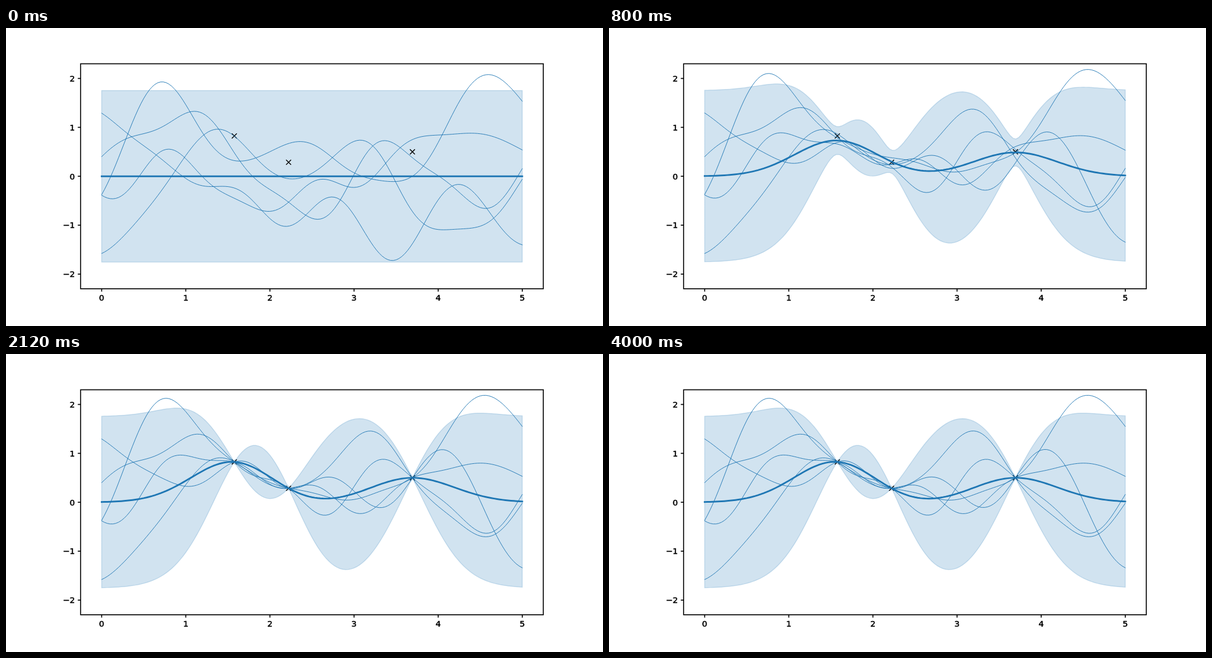
An HTML page with a canvas that plays this animation: 1058x529 px, repeating every 4.04 s.

```html
<!DOCTYPE html>
<html lang="en">
<head>
<meta charset="utf-8">
<title>Gaussian process regression</title>
<style>
  html, body { margin: 0; width: 100%; height: 100%; overflow: hidden; background: #fff; }
  canvas { display: block; }
</style>
</head>
<body>
<canvas id="stage" width="1058" height="529"></canvas>
<script>
const ctx = document.getElementById('stage').getContext('2d');
const BLUE = '#1f77b4';
const FRAME_MS = 40, FRAMES = 101, VARIANCE = 0.8;
const BOX = { left: 132.25, right: 952.2, top: 63.5, bottom: 462.9 };
const px = x => BOX.left + (x + 0.25) / 5.5 * (BOX.right - BOX.left);
const py = y => BOX.top + (2.3 - y) / 4.6 * (BOX.bottom - BOX.top);

// noise scales each point's error variance; bias shifts its value while it is uncertain.
const observed = [
  { x: 1.577, y: 0.825, noise: 1.07, bias: -0.5 },
  { x: 2.222, y: 0.286, noise: 0.73, bias: 0.1 },
  { x: 3.694, y: 0.5, noise: 1, bias: 0 }
];
const obsX = observed.map(o => o.x);
const grid = Array.from({ length: 151 }, (_, i) => i / 30);

// Each sampled function: heights at the knots once the data is fitted,
// and its values at the observations before any fitting.
const knots = [0, 0.4, 0.8, 1.2, 2.6, 3, 3.35, 4.05, 4.5, 5];
const samples = [
  { fitted: [1.295, .79, .43, .4, .49, .23, -.1, 1.08, .03, -1.34], free: [-.24, -1.02, -1.38] },
  { fitted: [.4, .83, 1.1, 1.38, -.25, .32, .88, .04, -.61, .16], free: [.48, -.53, .38] },
  { fitted: [-.37, 1.29, 2.12, 1.42, .15, .055, .25, 1.25, 2.175, 1.55], free: [.32, .67, 0] },
  { fitted: [-.38, -.04, .9, .88, .3, -.21, .04, .65, .8, .53], free: [-.45, -.53, .75] },
  { fitted: [-1.58, -.97, -.12, .75, .56, 1.29, 1.33, -.15, -.69, -.02], free: [.82, -.05, -.72] }
];

const dot = (a, b) => a.reduce((sum, v, i) => sum + v * b[i], 0);
const kernel = (a, b) => VARIANCE * Math.exp(-2 * (a - b) ** 2);

// Lower triangular root of the covariance between the points xs.
function rootOf(covariance, xs, nugget = () => 0) {
  const L = [];
  xs.forEach((x, i) => {
    L.push(xs.map(() => 0));
    for (let j = 0; j <= i; j++) {
      const rest = covariance(x, xs[j]) + (i === j ? nugget(i) : 0) - dot(L[i], L[j]);
      L[i][j] = i === j ? Math.sqrt(Math.max(rest, 1e-9)) : rest / L[j][j];
    }
  });
  return L;
}

function solveLower(L, b) {
  const x = b.map(() => 0);
  for (let i = 0; i < b.length; i++) x[i] = (b[i] - dot(L[i], x)) / L[i][i];
  return x;
}

// Smooth curve through (xs, values) under a covariance.
function interpolator(covariance, xs, nugget) {
  const root = rootOf(covariance, xs, nugget);
  const basis = grid.map(x => solveLower(root, xs.map(k => covariance(x, k))));
  return values => {
    const whitened = solveLower(root, values);
    return basis.map(row => dot(row, whitened));
  };
}

function posterior(frame) {
  const precision = 0.41 * (Math.exp(0.24 * frame) - 1) + 1e-9;
  const noise = observed.map(o => o.noise / precision);
  const root = rootOf(kernel, obsX, i => noise[i]);
  const target = solveLower(root, observed.map((o, i) => o.y + o.bias * Math.sqrt(noise[i])));
  const project = x => solveLower(root, obsX.map(o => kernel(x, o)));
  return {
    mean: x => dot(project(x), target),
    covariance: (a, b) => kernel(a, b) - dot(project(a), project(b))
  };
}

const fitted = posterior(FRAMES - 1);
const throughKnots = interpolator(fitted.covariance, knots, () => 1e-4);
const throughData = interpolator(kernel, obsX);
const freeRoot = rootOf(kernel, obsX);
for (const s of samples) {
  s.shape = throughKnots(s.fitted.map((y, i) => y - fitted.mean(knots[i])));
  s.whitened = solveLower(freeRoot, s.free);
}

function trace(values) {
  values.forEach((y, i) => ctx.lineTo(px(grid[i]), py(y)));
}

function strokeCurve(values, width) {
  ctx.beginPath();
  trace(values);
  ctx.lineWidth = width;
  ctx.strokeStyle = BLUE;
  ctx.stroke();
}

function segment(x1, y1, x2, y2) {
  ctx.beginPath();
  ctx.moveTo(x1, y1);
  ctx.lineTo(x2, y2);
  ctx.stroke();
}

function drawBand(mean, halfWidth) {
  ctx.beginPath();
  trace(mean.map((m, i) => m + halfWidth[i]));
  for (let i = grid.length - 1; i >= 0; i--) ctx.lineTo(px(grid[i]), py(mean[i] - halfWidth[i]));
  ctx.closePath();
  ctx.globalAlpha = 0.205;
  ctx.fillStyle = ctx.strokeStyle = BLUE;
  ctx.lineWidth = 1.47;
  ctx.fill();
  ctx.stroke();
  ctx.globalAlpha = 1;
}

function drawMarkers() {
  const r = 4.4;
  ctx.strokeStyle = '#000';
  ctx.lineWidth = 1.47;
  for (const { x, y } of observed) {
    segment(px(x) - r, py(y) - r, px(x) + r, py(y) + r);
    segment(px(x) - r, py(y) + r, px(x) + r, py(y) - r);
  }
}

function label(text, x, y, align) {
  ctx.textAlign = align;
  ctx.lineWidth = 0.5;
  ctx.fillText(text, x, y);
  ctx.strokeText(text, x, y);
}

function drawAxes() {
  ctx.strokeStyle = ctx.fillStyle = '#000';
  ctx.lineWidth = 1.7;
  ctx.strokeRect(BOX.left, BOX.top, BOX.right - BOX.left, BOX.bottom - BOX.top);
  for (let x = 0; x <= 5; x++) segment(px(x), BOX.bottom, px(x), BOX.bottom + 5);
  for (let y = -2; y <= 2; y++) segment(BOX.left, py(y), BOX.left - 5, py(y));
  ctx.font = '14.7px "DejaVu Sans", sans-serif';
  ctx.lineJoin = 'round';
  for (let x = 0; x <= 5; x++) label(String(x), px(x), 484.4, 'center');
  for (let y = -2; y <= 2; y++) {
    label(String(y).replace('-', '\u2212'), 122.2, py(y) + 5.4, 'right');
  }
  ctx.lineJoin = 'miter';
}

function draw(frame) {
  const { mean, covariance } = posterior(frame);
  const center = grid.map(mean);
  const halfWidth = grid.map(x => 1.96 * Math.sqrt(Math.max(covariance(x, x), 0)));
  const dataRoot = rootOf(covariance, obsX);

  ctx.fillStyle = '#fff';
  ctx.fillRect(0, 0, 1058, 529);
  ctx.lineCap = 'butt';
  drawBand(center, halfWidth);
  drawMarkers();
  ctx.lineCap = 'square';
  strokeCurve(center, 2.94);
  for (const { shape, whitened } of samples) {
    const slack = throughData(dataRoot.map(row => dot(row, whitened)));
    strokeCurve(center.map((m, i) => m + shape[i] + slack[i]), 0.95);
  }
  ctx.lineCap = 'butt';
  drawAxes();
}

const start = performance.now();
let shown = -1;
function tick() {
  const frame = Math.floor((performance.now() - start) / FRAME_MS) % FRAMES;
  if (frame !== shown) draw(shown = frame);
  requestAnimationFrame(tick);
}
tick();
</script>
</body>
</html>
```
